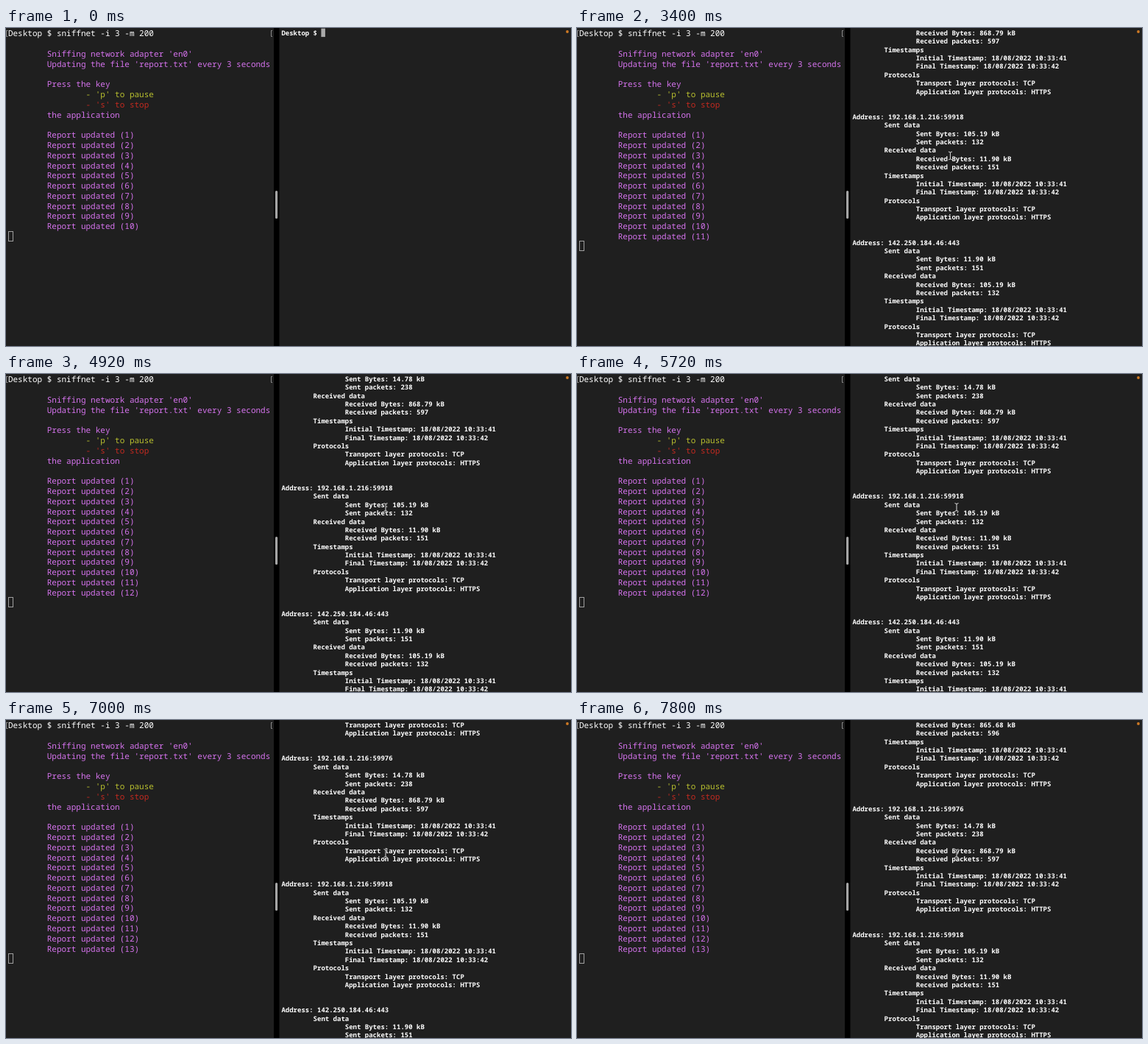
These frames come from a looping animation (768 px wide and 432 px high, 8000 ms). An HTML page with a canvas:

```html
<!DOCTYPE html>
<html lang="en">
<head>
<meta charset="utf-8">
<title>Two terminals</title>
<style>
html, body { margin: 0; width: 100%; height: 100%; overflow: hidden; background: #1f1f1f; }
canvas { display: block; width: 768px; height: 432px; }
</style>
</head>
<body>
<canvas id="stage" width="768" height="432"></canvas>
<script>
const ctx = document.getElementById('stage').getContext('2d');
const LOOP = 8000;
const FONT = '"Noto Sans Mono", "DejaVu Sans Mono", monospace';
const WHITE = '#fff', PINK = '#d673ee', YELLOW = '#b9c02f', RED = '#c32a20';

const LEFT = { x: 2.9, baseline: 11.4, row: 13.78, char: 6.6, font: `500 11px ${FONT}` };
const RIGHT = { x: 374.4, baseline: 9.9, row: 11.39, char: 5.4, font: `600 9px ${FONT}` };

// Times (ms) of events
const TYPED = 440, COMPLETED = 720, ENTERED = 2520;
const UPDATES = [760, 3760, 6760];
const SCROLLS = [4680, 4720, 4800, 5720, 5800, 6680, 6720, 6800, 6880,
                 7320, 7360, 7400, 7480, 7600, 7720];
const POINTER_START = 3200, POINTER_END = 3560;

const connection = (address, sent, sentPackets, received, receivedPackets) => [
  [0, `Address: ${address}`],
  [8, 'Sent data'],
  [16, `Sent Bytes: ${sent} kB`],
  [16, `Sent packets: ${sentPackets}`],
  [8, 'Received data'],
  [16, `Received Bytes: ${received} kB`],
  [16, `Received packets: ${receivedPackets}`],
  [8, 'Timestamps'],
  [16, 'Initial Timestamp: 18/08/2022 10:33:41'],
  [16, 'Final Timestamp: 18/08/2022 10:33:42'],
  [8, 'Protocols'],
  [16, 'Transport layer protocols: TCP'],
  [16, 'Application layer protocols: HTTPS'],
  [0, ''],
  [0, '']
];

const report = [
  connection('192.168.1.216:59975', '14.62', 236, '865.68', 596),
  connection('192.168.1.216:59976', '14.78', 238, '868.79', 597),
  connection('192.168.1.216:59918', '105.19', 132, '11.90', 151),
  connection('142.250.184.46:443', '11.90', 151, '105.19', 132)
].flat();
const FIRST_ROW = -20;

const passed = (times, t) => times.filter(time => t >= time).length;

function write(pane, row, column, text, color = WHITE) {
  ctx.font = pane.font;
  ctx.fillStyle = color;
  ctx.fillText(text, pane.x + column * pane.char, pane.baseline + row * pane.row);
}

function rect(color, x, y, w, h) {
  ctx.fillStyle = color;
  ctx.fillRect(x, y, w, h);
}

function line(color, width, ...points) {
  ctx.strokeStyle = color;
  ctx.lineWidth = width;
  ctx.beginPath();
  points.forEach(([x, y]) => ctx.lineTo(x, y));
  ctx.stroke();
}

function drawLeft(t) {
  write(LEFT, 0, 0, 'Desktop $ sniffnet -i 3 -m 200');
  line('#8a8a8a', 1, [2.5, 3.5], [0.5, 3.5], [0.5, 11.5], [2.5, 11.5]);
  line('#8a8a8a', 1, [362, 3.5], [360.5, 3.5], [360.5, 11.5], [362, 11.5]);

  write(LEFT, 2, 8, "Sniffing network adapter 'en0'", PINK);
  write(LEFT, 3, 8, "Updating the file 'report.txt' every 3 seconds", PINK);
  write(LEFT, 5, 8, 'Press the key', PINK);
  write(LEFT, 6, 16, "- 'p' to pause", YELLOW);
  write(LEFT, 7, 16, "- 's' to stop", RED);
  write(LEFT, 8, 8, 'the application', PINK);

  const count = 10 + passed(UPDATES, t);
  for (let i = 1; i <= count; i++) write(LEFT, 9 + i, 8, `Report updated (${i})`, PINK);

  ctx.strokeStyle = '#a0a0a0';
  ctx.lineWidth = 1;
  ctx.strokeRect(3.5, Math.round((10 + count) * LEFT.row) + 0.5, 6, 13);
}

function drawPrompt(t) {
  const command = t < TYPED ? '' : t < COMPLETED ? 'cat r' : 'cat report.txt';
  const text = 'Desktop $ ' + command;
  write(RIGHT, 0, 0, text);
  rect('#aaa', RIGHT.x + text.length * RIGHT.char, 0.7, 5.5, 11.4);
}

function drawReport(t) {
  const top = FIRST_ROW + passed(SCROLLS, t);
  report.forEach(([indent, text], i) => {
    const row = top + i;
    if (row >= 0 && row < 38) write(RIGHT, row, indent, text);
  });
}

function drawPointer(t) {
  const p = Math.min(1, (t - POINTER_START) / (POINTER_END - POINTER_START));
  const k = 1 - (1 - p) ** 2;
  const bezier = (a, b, c) => (1 - k) ** 2 * a + 2 * k * (1 - k) * b + k * k * c;
  const x = bezier(472, 494, 516), y = bezier(191, 156, 181);
  const shape = (color, width) => {
    line(color, width, [x - 2.5, y - 5.5], [x, y - 4.5], [x + 2.5, y - 5.5]);
    line(color, width, [x, y - 4.5], [x, y + 4.5]);
    line(color, width, [x - 2.5, y + 5.5], [x, y + 4.5], [x + 2.5, y + 5.5]);
  };
  shape('#1f1f1f', 2.4);
  shape('#ddd', 1);
}

function draw(t) {
  rect('#1f1f1f', 0, 0, 768, 432);
  drawLeft(t);

  rect('#000', 364, 0, 7.5, 432);
  ctx.fillStyle = '#a6a6a6';
  ctx.beginPath();
  ctx.roundRect(366, 221, 3.2, 38, 1.6);
  ctx.fill();

  if (t < ENTERED) drawPrompt(t);
  else drawReport(t);

  ctx.fillStyle = '#d07a24';
  ctx.beginPath();
  ctx.arc(763, 5, 1.9, 0, 2 * Math.PI);
  ctx.fill();

  if (t >= POINTER_START) drawPointer(t);
}

ctx.textRendering = 'geometricPrecision';
const start = performance.now();
function tick() {
  draw((performance.now() - start) % LOOP);
  requestAnimationFrame(tick);
}
tick();
</script>
</body>
</html>
```
